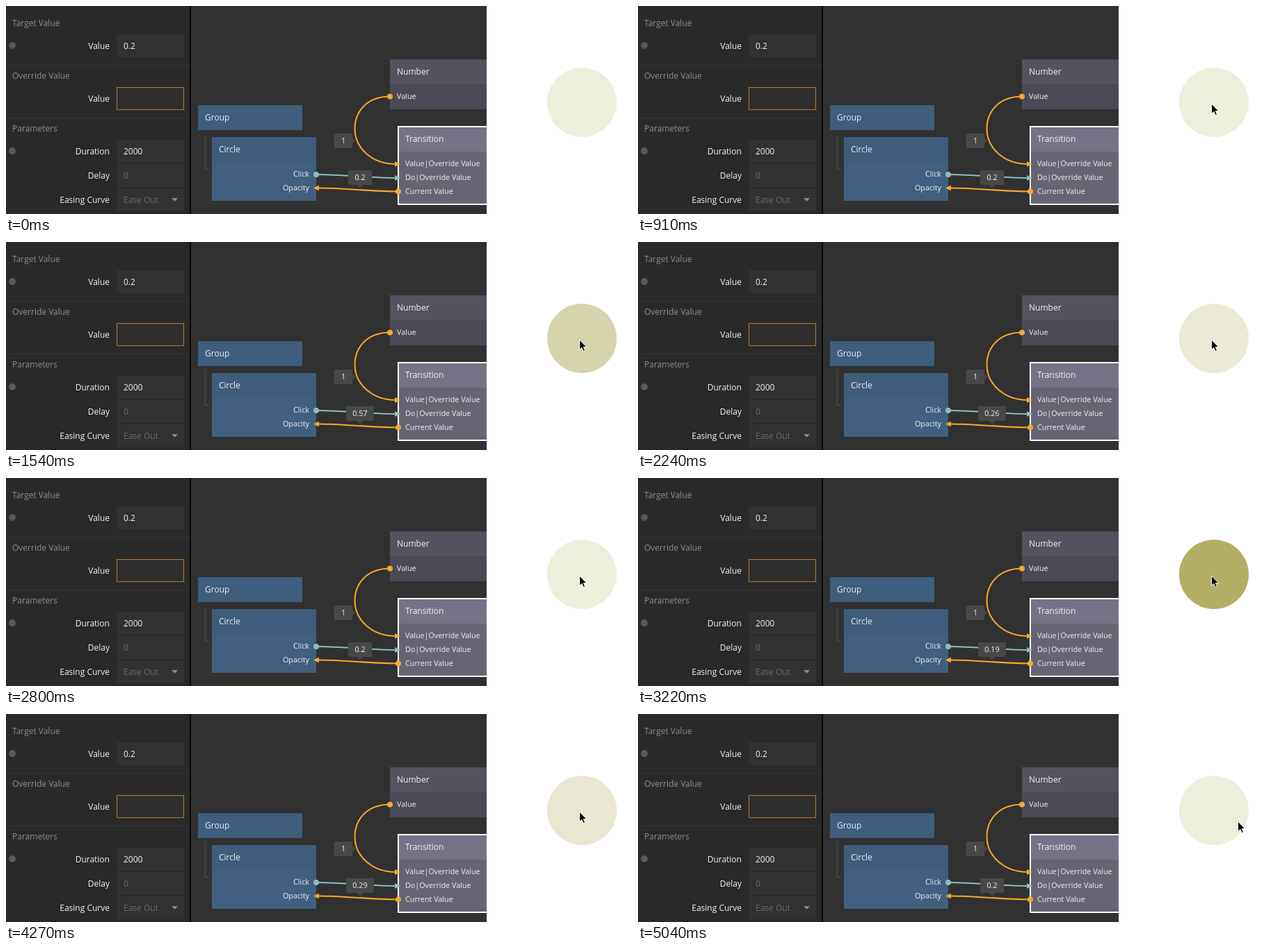
These frames come from a looping animation (900x300 px, 5.11 s). An HTML page:

```html
<!DOCTYPE html>
<html lang="en">
<head>
<meta charset="utf-8">
<title>Transition node</title>
<style>
  html, body { margin: 0; width: 100%; height: 100%; overflow: hidden; background: #313131; }
  svg { display: block; font: 12px "Open Sans", sans-serif; fill: #f2f2f2; }
  .end { text-anchor: end; }
  .mid { text-anchor: middle; }
  .dim { fill: #8d8d8d; }
  .off { fill: #6c6c6c; }
  .small { font-size: 10.75px; }
  .box { fill: #313131; }
  .tag { fill: #484848; }
  .wire { fill: none; stroke-width: 2; }
  .orange { fill: #f6a82f; }
  .teal { fill: #8fbcc3; }
  .wire.orange { fill: none; stroke: #f6a82f; }
  .wire.teal { fill: none; stroke: #8fbcc3; }
</style>
</head>
<body>
<svg width="900" height="300" viewBox="0 0 900 300">
  <rect width="900" height="300" fill="#313131"/>

  <!-- property panel -->
  <rect width="264" height="300" fill="#292929"/>
  <rect x="264" width="2" height="300" fill="#080808"/>
  <path d="M0 85.5H264M0 161.5H264" stroke="#343434"/>
  <g class="dim">
    <text x="9" y="29">Target Value</text>
    <text x="9" y="105">Override Value</text>
    <text x="9" y="181">Parameters</text>
  </g>
  <g fill="#5a5a5a"><circle cx="9" cy="57" r="5"/><circle cx="9" cy="209" r="5"/></g>
  <g class="end">
    <text x="149" y="62">Value</text>
    <text x="149" y="138">Value</text>
    <text x="149" y="214">Duration</text>
    <text x="149" y="249">Delay</text>
    <text x="149" y="284">Easing Curve</text>
  </g>
  <g class="box">
    <rect x="159" y="41" width="97" height="33"/>
    <rect x="159.5" y="117.5" width="96" height="32" fill="#2d2d2d" stroke="#b17d2d"/>
    <rect x="159" y="193" width="97" height="33"/>
    <rect x="159" y="228" width="97" height="33"/>
    <rect x="159" y="263" width="97" height="33"/>
  </g>
  <text x="169" y="62">0.2</text>
  <text x="169" y="214">2000</text>
  <text x="169" y="249" class="off">0</text>
  <text x="169" y="284" class="off">Ease Out</text>
  <path d="M238 277H247L242.500 282Z" fill="#858585"/>

  <!-- nodes -->
  <path d="M286.500 184V235.500H291" fill="none" stroke="#505050"/>
  <rect x="276" y="143" width="150" height="36" fill="#3f5d7d"/>
  <rect x="296" y="189" width="150" height="92" fill="#415f7e"/>
  <rect x="296" y="189" width="150" height="36" fill="#3f5c7b"/>
  <rect x="552" y="77" width="150" height="72" fill="#4a4955"/>
  <rect x="552" y="77" width="150" height="36" fill="#53525f"/>
  <rect x="564" y="174" width="150" height="112" fill="#676574"/>
  <rect x="564" y="174" width="150" height="36" fill="#757385"/>
  <rect x="564" y="174" width="150" height="112" fill="none" stroke="#fff" stroke-width="2"/>
  <text x="286" y="165">Group</text>
  <text x="306" y="211">Circle</text>
  <text x="562" y="99">Number</text>
  <text x="574" y="196">Transition</text>
  <g class="small">
    <text x="562" y="134">Value</text>
    <text x="574" y="231">Value|Override Value</text>
    <text x="574" y="251">Do|Override Value</text>
    <text x="574" y="271">Current Value</text>
    <text x="436" y="246" class="end">Click</text>
    <text x="436" y="266" class="end">Opacity</text>
  </g>

  <!-- connections -->
  <path class="wire orange" d="M552 130.500C519 130.500 501.500 152 501.500 177C501.500 205 526 228 561 228"/>
  <path class="wire teal" d="M446 243C486 243 522 248 561 248"/>
  <path class="wire orange" d="M564 267.500C524 267.500 488 262.500 449 262.500"/>
  <g class="orange">
    <circle cx="552" cy="130.500" r="4"/>
    <circle cx="564" cy="267.500" r="4"/>
    <path d="M559 224L567 228L559 232ZM450 258.500L442 262.500L450 266.500Z"/>
  </g>
  <g class="teal">
    <circle cx="446" cy="243" r="4"/>
    <path d="M559 244L567 248L559 252Z"/>
  </g>
  <g class="small mid">
    <path class="tag" d="M498 190L502 194.500L498 199Z"/>
    <rect class="tag" x="472" y="184" width="26" height="21" rx="2"/>
    <text x="485" y="198">1</text>
    <path class="tag" d="M504.500 258H513.500L509 262.500Z"/>
    <rect class="tag" id="tag" y="237" height="21" rx="2"/>
    <text id="label" x="509" y="251"></text>
  </g>

  <!-- preview -->
  <rect x="691" width="209" height="300" fill="#fff"/>
  <circle id="disc" cx="828" cy="139" r="50" fill="#aca858"/>
  <path id="cursor" d="M0 0V14.500L3.400 11.400L5.600 16.500L8 15.500L5.800 10.500H10.300Z"
        fill="#000" stroke="#fff" stroke-width="1" stroke-linejoin="round"/>
</svg>
<script>
  const LOOP = 5110, STEP = 70, DURATION = 2000;
  const REST = 0.2, OVERRIDE = 1;
  const CLICKS = [975, 3155];
  const LABEL_LAG = 113;
  const [disc, label, tag, cursor] =
    ["disc", "label", "tag", "cursor"].map(id => document.getElementById(id));

  const progress = (t, from, to) => Math.min(1, Math.max(0, (t - from) / (to - from)));
  const smooth = p => p * p * (3 - 2 * p);

  // Each click jumps to the override, then eases out (cubic) to rest.
  function valueAt(t) {
    const start = CLICKS.filter(c => c <= t).pop();
    if (start === undefined) return REST;
    const left = 1 - progress(t, start, start + DURATION);
    return left ? REST + (OVERRIDE - REST) * left ** 3 : REST - 1e-9;
  }

  function cursorAt(t) {
    const enter = smooth(progress(t, 100, 620));
    const leave = smooth(progress(t, 4690, 5040));
    return [720 + 104.5 * enter + 38 * leave, 255 - 114 * enter + 14 * leave];
  }

  function draw() {
    const t = Math.floor(performance.now() % LOOP / STEP) * STEP;
    disc.setAttribute("fill-opacity", valueAt(t));

    const text = String(Math.floor(valueAt(t - LABEL_LAG) * 100) / 100);
    const width = text.length > 3 ? 40 : text.length > 1 ? 34 : 26;
    label.textContent = text;
    tag.setAttribute("width", width);
    tag.setAttribute("x", 509 - width / 2);

    cursor.setAttribute("transform", `translate(${cursorAt(t)})`);
    cursor.setAttribute("visibility", t > 100 ? "visible" : "hidden");
    requestAnimationFrame(draw);
  }
  draw();
</script>
</body>
</html>
```
